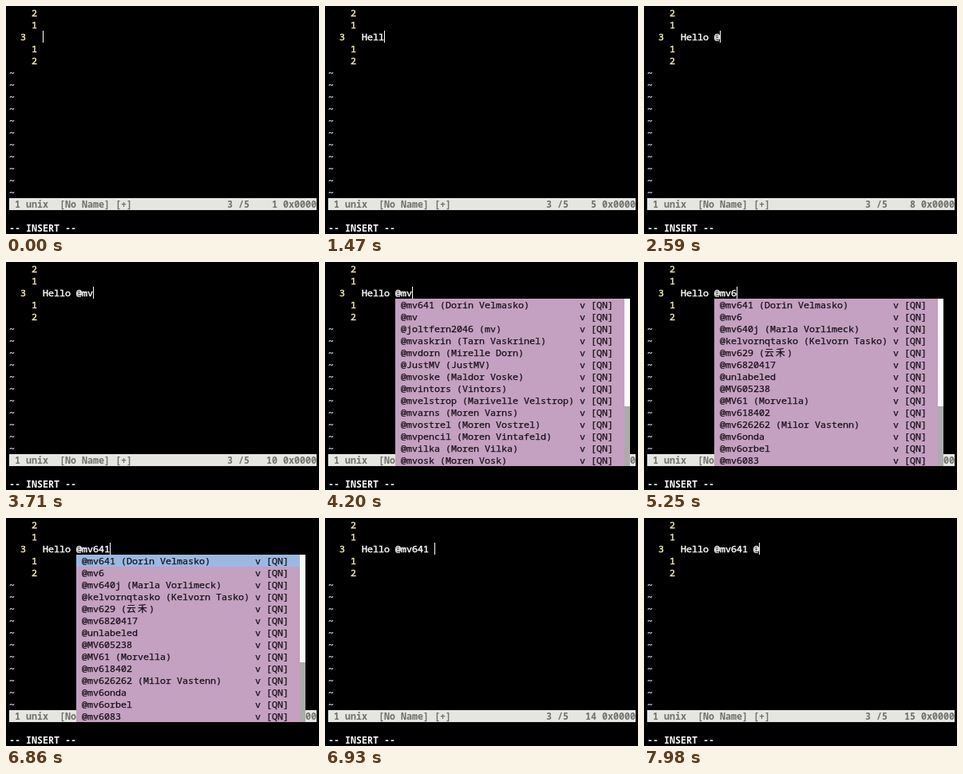
An HTML page with a canvas for the animation above (8 s loop, 392x286 px).

```html
<!DOCTYPE html>
<html lang="en">
<head>
<meta charset="utf-8">
<title>Editor mention completion</title>
<style>
  html, body { margin: 0; width: 100%; height: 100%; overflow: hidden; background: #000; }
  canvas { display: block; width: 392px; height: 286px; }
</style>
</head>
<body>
<canvas id="screen"></canvas>
<script>
const WIDTH = 392, HEIGHT = 286, LOOP = 8000;
const CELL_W = 7, ROW_H = 15, LEFT = 4, TOP = 1;
const TEXT_COL = 6, MENU_COL = 12, MENU_ROW = 3;
const FONT = '11.667px "Noto Sans Mono", "Noto Sans CJK SC", "Noto Sans CJK", monospace';
const BOLD = 700;

const canvas = document.getElementById('screen');
const ctx = canvas.getContext('2d');
const ratio = window.devicePixelRatio || 1;
canvas.width = WIDTH * ratio;
canvas.height = HEIGHT * ratio;
ctx.scale(ratio, ratio);
ctx.lineJoin = 'round';

const firstMenu = [
  '@mv641 (Dorin Velmasko)', '@mv', '@joltfern2046 (mv)',
  '@mvaskrin (Tarn Vaskrinel)', '@mvdorn (Mirelle Dorn)', '@JustMV (JustMV)',
  '@mvoske (Maldor Voske)', '@mvintors (Vintors)',
  '@mvelstrop (Marivelle Velstrop)', '@mvarns (Moren Varns)',
  '@mvostrel (Moren Vostrel)', '@mvpencil (Moren Vintafeld)',
  '@mvilka (Moren Vilka)', '@mvosk (Moren Vosk)'
];
const narrowedMenu = [
  '@mv641 (Dorin Velmasko)', '@mv6', '@mv640j (Marla Vorlimeck)',
  '@kelvornqtasko (Kelvorn Tasko)', '@mv629 (云禾)', '@mv6820417',
  '@unlabeled', '@MV605238', '@MV61 (Morvella)', '@mv618402',
  '@mv626262 (Milor Vastenn)', '@mv6onda', '@mv6orbel', '@mv6083'
];

// Each step: start time, typed line, open menu, whether its first item is selected.
const steps = [
  [0, ''], [700, 'H'], [1050, 'He'], [1260, 'Hel'], [1470, 'Hell'],
  [1680, 'Hello'], [1820, 'Hello '], [2590, 'Hello @'],
  [3290, 'Hello @m'], [3710, 'Hello @mv'],
  [4200, 'Hello @mv', firstMenu],
  [4620, 'Hello @mv6', firstMenu],
  [4970, 'Hello @mv6', narrowedMenu],
  [5880, 'Hello @mv641', narrowedMenu, true],
  [6930, 'Hello @mv641 '],
  [7980, 'Hello @mv641 @']
];

const colX = col => LEFT + col * CELL_W;
const rowY = row => TOP + row * ROW_H;

function fill(col, row, cols, rows, color) {
  ctx.fillStyle = color;
  ctx.fillRect(colX(col), rowY(row), cols * CELL_W, rows * ROW_H);
}

// Regular text gets a fine outline of the given width for a medium weight.
function print(text, col, row, color, { weight = 400, outline = 0 } = {}) {
  ctx.font = `${weight} ${FONT}`;
  ctx.fillStyle = ctx.strokeStyle = color;
  ctx.lineWidth = outline;
  for (const char of text) {
    const x = colX(col), y = rowY(row) + 12;
    ctx.fillText(char, x, y);
    if (outline) ctx.strokeText(char, x, y);
    col += char >= '\u3000' ? 2 : 1;
  }
}

function drawStatus(column) {
  const style = { weight: BOLD };
  fill(0, 16, 55, 1, '#e6e6e1');
  print(' 1 unix  [No Name] [+]', 0, 16, '#70706e', style);
  print('3 /5' + String(column).padStart(5) + ' 0x0000', 39, 16, '#70706e', style);
  print('-- INSERT --', 0, 18, '#fff', style);
}

function drawMenu(items, selected) {
  const kindCol = MENU_COL + 2 + Math.max(...items.map(item => item.length));
  const barCol = kindCol + 8;
  const style = { outline: 0.25 };
  fill(MENU_COL, MENU_ROW, barCol - MENU_COL, items.length, '#c4a0c1');
  if (selected) fill(MENU_COL, MENU_ROW, barCol - MENU_COL, 1, '#9cb8e2');
  fill(barCol, MENU_ROW, 1, 9, '#fafafa');
  fill(barCol, MENU_ROW + 9, 1, 5, '#acacac');
  items.forEach((item, i) => {
    print(item, MENU_COL + 1, MENU_ROW + i, '#161016', style);
    print('v [QN]', kindCol, MENU_ROW + i, '#161016', style);
  });
}

function draw(time) {
  const [, line, menu, selected] = steps.findLast(step => step[0] <= time);
  const style = { outline: 0.45 };
  ctx.fillStyle = '#000';
  ctx.fillRect(0, 0, WIDTH, HEIGHT);

  ['2', '1', '3', '1', '2'].forEach((label, row) =>
    print(label, row === 2 ? 2 : 4, row, '#f6ecb8', style));
  for (let row = 5; row < 16; row++) print('~', 0, row, '#bcc0dc', style);

  print(line, TEXT_COL, 2, '#fff', style);
  ctx.fillStyle = '#fff';
  ctx.fillRect(colX(TEXT_COL + line.length), rowY(2), 1, ROW_H);

  drawStatus(line.length + 1);
  if (menu) drawMenu(menu, selected);
}

function tick() {
  draw(performance.now() % LOOP);
  requestAnimationFrame(tick);
}
tick();
</script>
</body>
</html>
```
